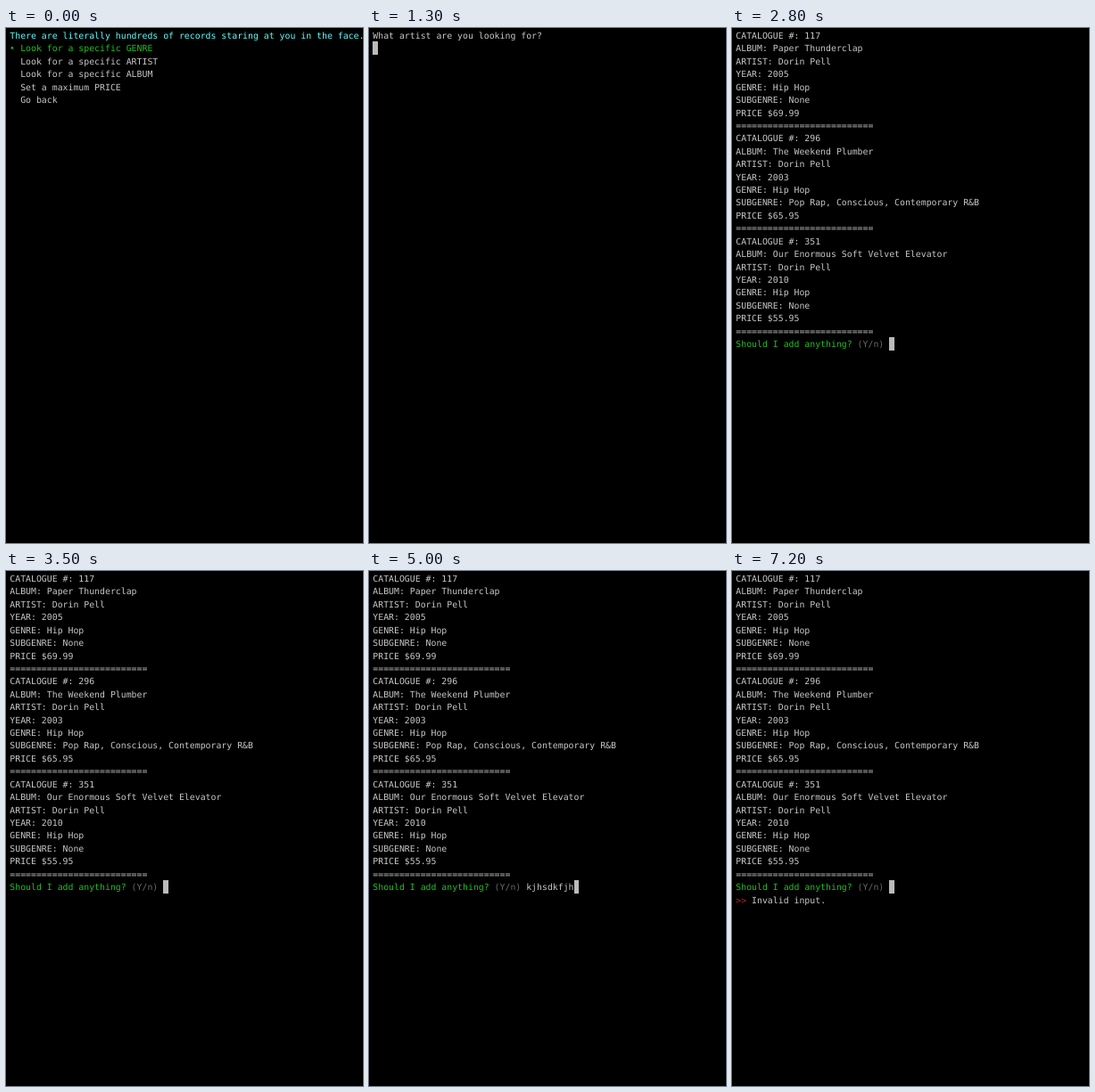
An HTML page for the animation above (8000 ms loop, 400 px wide and 578 px high).

```html
<!DOCTYPE html>
<html lang="en">
<head>
<meta charset="utf-8">
<title>Record shop terminal</title>
<style>
  html, body { margin: 0; width: 100%; height: 100%; overflow: hidden; background: #000; }
  pre {
    position: absolute; left: 4.3px; top: 3px; margin: 0;
    font: 9.85px/14.42px "DejaVu Sans Mono", monospace;
    text-rendering: geometricPrecision;
    color: #c7c7c7;
  }
  b {
    display: inline-block; position: relative; top: -2px;
    width: 1ch; height: 14.9px; margin-bottom: -.5px; vertical-align: top; background: #bbb;
  }
  .cyan { color: #60fdff; }
  .green { color: #20bf20; }
  .gray { color: #686868; }
  .red { color: #c4201a; }
</style>
</head>
<body>
<pre id="term"></pre>
<script>
const LOOP = 8000;
const CURSOR = '<b></b>';
const ARTIST = 'Dorin Pell';
const term = document.getElementById('term');

const paint = (color, text) => `<span class="${color}">${text}</span>`;

function menu(selected) {
  const options = ['GENRE', 'ARTIST', 'ALBUM'].map(s => 'Look for a specific ' + s);
  options.push('Set a maximum PRICE', 'Go back');
  const rows = options.map((s, i) => i === selected ? paint('green', '‣ ' + s) : '  ' + s);
  const title = 'There are literally hundreds of records staring at you in the face.';
  return [paint('cyan', title), ...rows].join('\n');
}

const question = typed => `What artist are you looking for?\n${typed}${CURSOR}`;

const record = ([id, album, year, subgenre, price]) => `CATALOGUE #: ${id}
ALBUM: ${album}
ARTIST: ${ARTIST}
YEAR: ${year}
GENRE: Hip Hop
SUBGENRE: ${subgenre}
PRICE $${price}
${'='.repeat(26)}
`;

const results = [
  [117, 'Paper Thunderclap', 2005, 'None', '69.99'],
  [296, 'The Weekend Plumber', 2003, 'Pop Rap, Conscious, Contemporary R&amp;B', '65.95'],
  [351, 'Our Enormous Soft Velvet Elevator', 2010, 'None', '55.95']
].map(record).join('');

const prompt = typed =>
  results + paint('green', 'Should I add anything?') + paint('gray', ' (Y/n) ') + typed + CURSOR;
const invalid = typed => prompt(typed) + '\n' + paint('red', '&gt;&gt;') + ' Invalid input.';

// Screens as [start time, markup]
const screens = [[0, menu(0)], [600, menu(1)], [1200, question('')]];
const add = (view, text, steps) =>
  steps.forEach(([time, count]) => screens.push([time, view(text.slice(0, count))]));

add(question, 'dorin', [[2000, 1], [2100, 2], [2200, 3], [2300, 4], [2500, 5]]);
screens.push([2800, prompt('')], [4500, results + CURSOR]);
add(prompt, 'kjhsdkfjhsk', [[4600, 2], [4700, 4], [4800, 5], [4900, 7], [5000, 9], [5100, 11]]);
add(invalid, 'kjhs', [[5200, 0], [6000, 1], [6200, 2], [6700, 3], [6800, 4], [7000, 0]]);

let shown;
function draw() {
  const time = performance.now() % LOOP;
  const screen = screens.findLast(([start]) => start <= time);
  if (screen !== shown) term.innerHTML = screen[1];
  shown = screen;
  requestAnimationFrame(draw);
}
draw();
</script>
</body>
</html>
```
